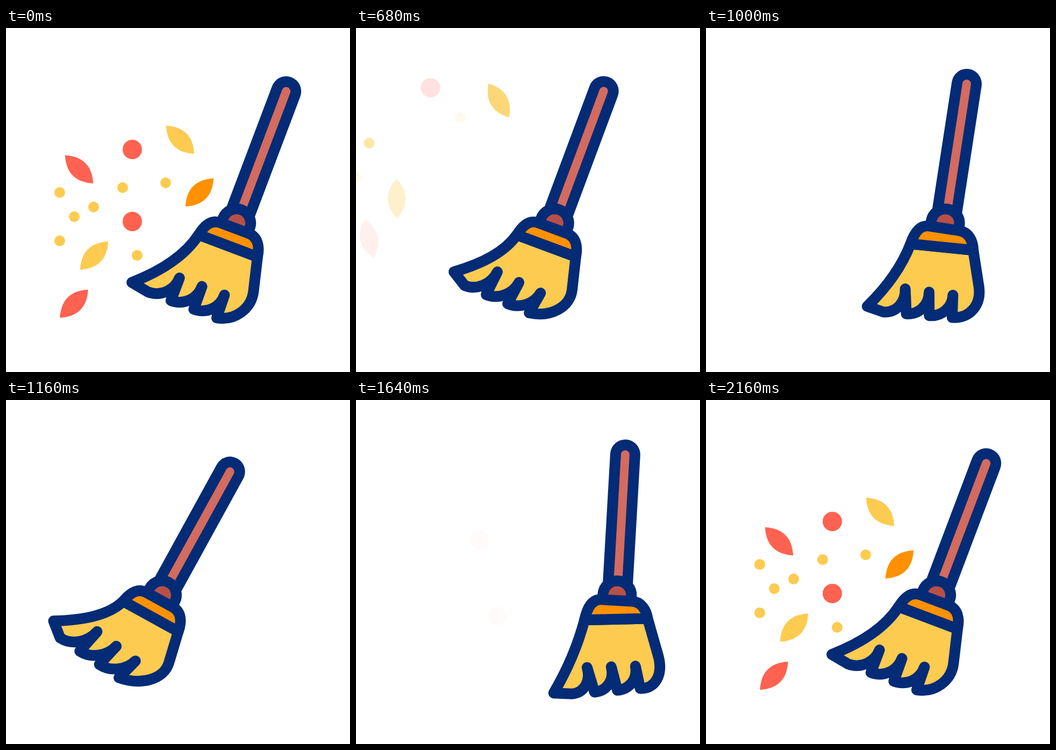
An HTML page with a canvas that plays this animation: 640x640 px, repeating every 2200 ms.

```html
<!DOCTYPE html>
<html lang="en">
<head>
<meta charset="utf-8">
<title>Broom sweeping leaves</title>
<style>
  html, body { margin: 0; width: 100%; height: 100%; overflow: hidden; background: #fff; }
  canvas { display: block; width: 640px; height: 640px; }
</style>
</head>
<body>
<canvas width="640" height="640"></canvas>
<script>
const ctx = document.querySelector('canvas').getContext('2d');
const LOOP = 2200, STEP = 40, START = 240;
const NAVY = '#042b76', YELLOW = '#fccb50', ORANGE = '#ff9100', RED = '#ff6250';

const clamp = (v, lo = 0, hi = 1) => Math.min(hi, Math.max(lo, v));
const mix = (a, b, k) => a + (b - a) * k;
const mixPoint = (a, b, k) => [mix(a[0], b[0], k), mix(a[1], b[1], k)];
const mixPose = (a, b, k) => a.map((p, i) => mixPoint(p, b[i], k));
const ease = k => (1 - Math.cos(Math.PI * clamp(k))) / 2;

// Value of a [time, value] track, eased between its turning points
function track(keys, t) {
  const i = keys.findIndex(key => t < key[0]);
  if (i < 0) return keys.at(-1)[1];
  if (i === 0) return keys[0][1];
  const [t0, v0] = keys[i - 1], [t1, v1] = keys[i];
  return mix(v0, v1, ease((t - t0) / (t1 - t0)));
}

// Two strokes to the left and right, then back to rest
const SLIDE = [[START, 429], [552, 285], [872, 530], [1192, 285], [1516, 530], [1786, 429]];
const TILT = [[START, 20.7], [552, 32.6], [866, -1.5], [1219, 31], [1522, -2], [1890, 20.7]];
const REST = [[START, 1], [400, 0], [1640, 0], [1930, 1]];

// Bristle poses: tip, first and last notch top, first and last notch end, elbow
const restPose = [[-143, 173], [-63, 134], [26.5, 134], [-63, 179], [28, 179], [74.5, 108]];
const backPose = [[-144, 151], [-68, 123], [21, 132], [-73, 170], [14, 174], [74, 106]];
const frontPose = [[-109, 188], [-49, 138], [40.6, 131], [-33.5, 183], [51, 172], [82, 108]];

function stroke(color, width, path) {
  ctx.strokeStyle = color;
  ctx.lineWidth = width;
  ctx.stroke(path);
}

function shape(fill, path) {
  ctx.fillStyle = fill;
  ctx.fill(path);
  stroke(NAVY, 20, path);
}

// Quarter-round curve from a to b, bulging towards corner
function bulge(path, a, corner, b) {
  path.bezierCurveTo(...mixPoint(a, corner, .55), ...mixPoint(b, corner, .55), ...b);
}

function bristles([tip, top1, top3, end1, end3, elbow], skew) {
  const left = [-58, 46 + skew], right = [59, 46 - skew];

  const cap = new Path2D();
  cap.moveTo(...left);
  cap.bezierCurveTo(-54, 26, -46, 11, -28, 11);
  cap.lineTo(28, 11);
  cap.bezierCurveTo(46, 11, 56, 26, ...right);
  cap.closePath();

  const brush = new Path2D();
  brush.moveTo(...left);
  brush.quadraticCurveTo(-72, (left[1] + tip[1]) / 2, ...tip);
  let from = mixPoint(end1, end3, -.5);
  brush.lineTo(...from);
  for (const k of [0, .5, 1]) {
    const end = mixPoint(end1, end3, k);
    bulge(brush, from, end, mixPoint(top1, top3, k));
    brush.lineTo(...end);
    from = end;
  }
  bulge(brush, from, mixPoint(right, elbow, 1.95), elbow);
  brush.lineTo(...right);
  brush.closePath();

  shape(YELLOW, brush);
  shape(ORANGE, cap);
}

const shaft = new Path2D('M0-261V-20');
const collar = new Path2D('M-26.5 10V1A26.5 26.5 0 0 1 26.5 1V10');

function broom(t) {
  const x = track(SLIDE, t);
  const rest = track(REST, t);
  const bend = clamp((x - 369) / 112, -.28, 1.05);
  const pose = mixPose(mixPose(backPose, frontPose, bend), restPose, rest);

  ctx.save();
  ctx.translate(x, 362);
  ctx.rotate(track(TILT, t) * Math.PI / 180);
  ctx.lineCap = ctx.lineJoin = 'round';
  stroke(NAVY, 56, shaft);
  stroke('#d36b5e', 16, shaft);
  shape('#b85048', collar);
  bristles(pose, 4.5 * Math.max(0, bend) * (1 - rest));
  ctx.restore();
}

const dot = r => {
  const path = new Path2D();
  path.arc(0, 0, r, 0, 7);
  return path;
};
const small = dot(10), big = dot(18);
const leaf = new Path2D('M-37 0Q0-33 37 0Q0 33-37 0');

// x, y, color, path, angle; in the order they are swept away
const speck = (x, y) => [x, y, YELLOW, small, 0];
const ball = (x, y) => [x, y, RED, big, 0];
const blade = (x, y, color, angle) => [x, y, color, leaf, angle];
const litter = [
  speck(244, 423), speck(127, 351), blade(360, 306, ORANGE, 135), speck(217, 297),
  ball(235, 360), blade(136, 263, RED, 45), speck(163, 333),
  speck(297, 288), blade(126.5, 513, RED, 135), speck(100, 396),
  ball(235, 226), blade(164, 423.5, YELLOW, 135), speck(100, 306), blade(324, 208, YELLOW, 45)
];

// Two gusts of seven pieces: the first bunches up late, the second early
function leaveTime(i) {
  const k = i % 7 / 6;
  return i < 7 ? 380 - 68 * (1 - k) ** 2 : 482 + 148 * k ** 3;
}

function piece([x, y, color, path, angle], i, t) {
  let alpha;
  if (t < 1200) {
    // shared drift, then each piece is whisked away
    const drift = Math.max(0, (t - START) / 160) ** 1.5;
    const gone = clamp((t - leaveTime(i)) / 220);
    const fling = gone ** 1.2;
    x -= 10.5 * drift + 62 * fling;
    y -= 13.5 * drift + 68 * fling;
    angle += (angle < 90 ? 60 : -65) * gone;
    alpha = 1 - gone;
  } else {
    alpha = clamp((t - (path === big ? 1632 : 1660 + i * 14)) / 300);
    const left = 1 - ease(alpha);
    x += (y - 250) / 4 * left;
    y += (20 + y / 16) * left;
  }
  if (alpha <= 0) return;
  ctx.save();
  ctx.globalAlpha = alpha;
  ctx.translate(x, y);
  ctx.rotate(angle * Math.PI / 180);
  ctx.fillStyle = color;
  ctx.fill(path);
  ctx.restore();
}

const origin = performance.now();
function tick() {
  const t = Math.floor((performance.now() - origin) % LOOP / STEP) * STEP;
  ctx.clearRect(0, 0, 640, 640);
  broom(t);
  litter.forEach((p, i) => piece(p, i, t));
  requestAnimationFrame(tick);
}
tick();
</script>
</body>
</html>
```
